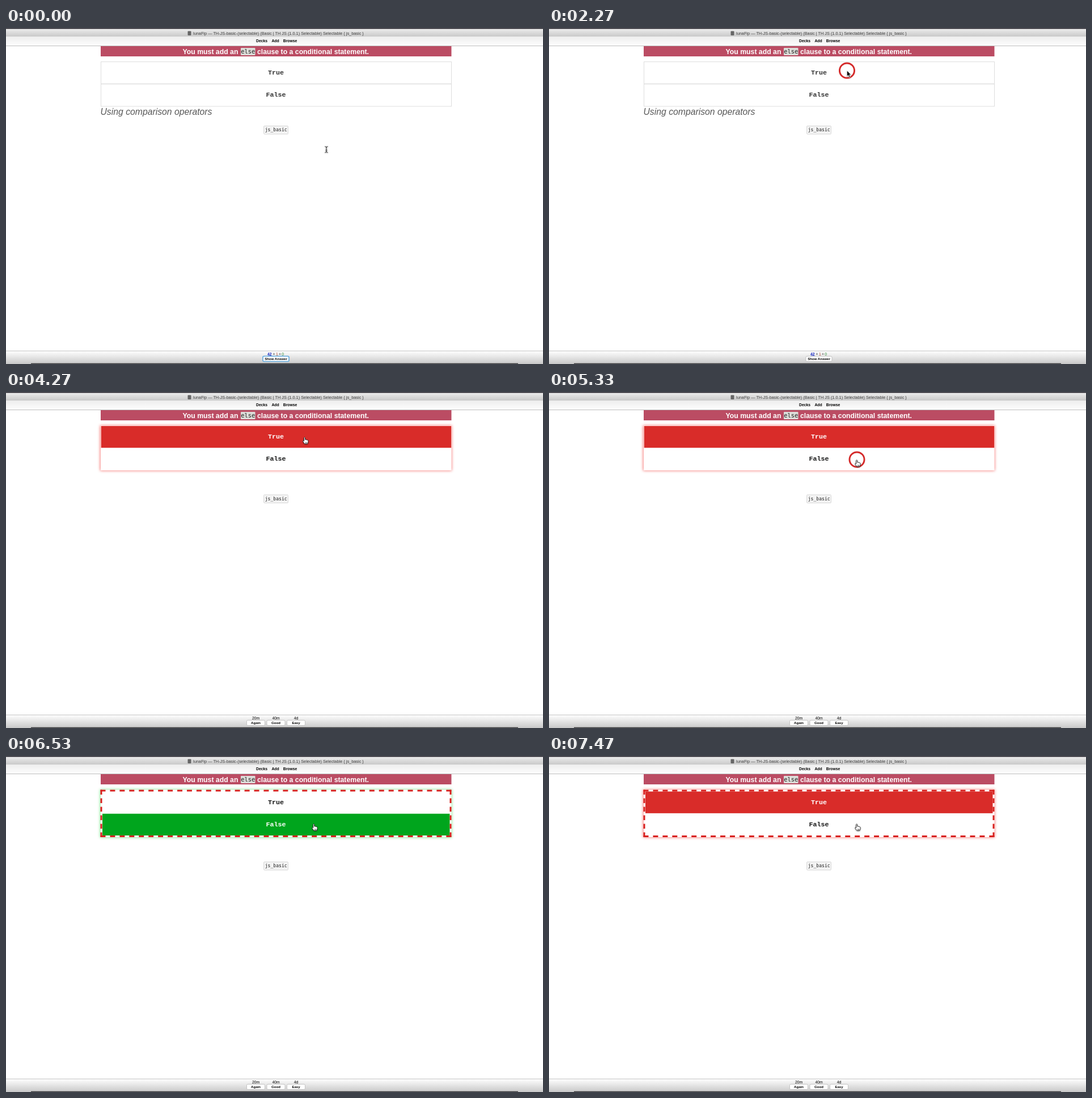
Recreate the animation shown at these times as an HTML page. Size 947x592 px, loop 8000 ms.

```html
<!DOCTYPE html>
<html lang="en">
<head>
<meta charset="utf-8">
<title>Selectable card</title>
<style>
html, body { margin: 0; width: 100%; height: 100%; overflow: hidden; background: #fff; }
svg { display: block; width: 947px; height: 592px; font-family: "Liberation Sans", Arial, sans-serif; }
text { white-space: pre; }
.b { font-weight: bold; }
.m { text-anchor: middle; }
.mono { font-family: "DejaVu Sans Mono", monospace; }
.opt { font: bold 11.7px "Liberation Mono", "Courier New", monospace; text-anchor: middle; }
.small { font-size: 6.8px; }
.btn { font-size: 6.1px; font-weight: bold; text-anchor: middle; }
</style>
</head>
<body>
<svg viewBox="0 0 947 592">
  <defs>
    <linearGradient id="bar" x2="0" y2="1"><stop stop-color="#ececec"/><stop offset="1" stop-color="#c9c9c9"/></linearGradient>
    <linearGradient id="tools" x2="0" y2="1"><stop stop-color="#ededed"/><stop offset="1" stop-color="#fdfdfd"/></linearGradient>
    <linearGradient id="foot" x2="0" y2="1"><stop stop-color="#fff"/><stop offset="1" stop-color="#c8c8c8"/></linearGradient>
    <filter id="blur" filterUnits="userSpaceOnUse" x="150" y="45" width="655" height="115"><feGaussianBlur stdDeviation="2.8"/></filter>
    <filter id="shade" x="-50%" y="-50%" width="220%" height="220%"><feDropShadow dx="0" dy="1" stdDeviation=".8" flood-opacity=".4"/></filter>
  </defs>

  <rect width="947" height="592" fill="#fff"/>
  <rect width="947" height="2" fill="#25232b"/>
  <rect y="1.5" width="947" height="13.5" fill="url(#bar)"/>
  <rect y="15" width="947" height="16" fill="url(#tools)"/>
  <rect y="31" width="947" height="1" fill="#bdbdbd"/>
  <rect x="320.5" y="5.5" width="6" height="7.5" rx="1" fill="#666"/>
  <text x="330" y="11.6" font-size="7.35" fill="#3c3c3c">lunaFip — TH-JS-basic-(selectable) (Basic | TH JS (1.0.1) Selectable) Selectable { js_basic }</text>
  <g class="b m small">
    <text x="451" y="25">Decks</text><text x="475" y="25">Add</text><text x="501" y="25">Browse</text>
  </g>

  <rect x="167" y="32" width="618.5" height="18" fill="#bb4c63"/>
  <g class="b" font-size="12.28" fill="#fff">
    <text x="311.5" y="45.6">You must add an</text>
    <text x="443" y="45.6">clause to a conditional statement.</text>
  </g>
  <rect x="414" y="35" width="25.5" height="13" rx="1" fill="#dcdcd8"/>
  <text class="mono m" x="426.7" y="45.4" font-size="10.4" fill="#222">else</text>

  <rect id="glow" x="166" width="620" y="59" filter="url(#blur)"/>
  <rect id="panel" x="167" y="59.5" width="618.5" fill="#fff"/>
  <g id="lines" fill="none" stroke="#dedede">
    <rect x="167.5" y="59.5" width="618" height="78.5"/>
    <path d="M167 98.5H785.5" stroke-width="1.6"/>
  </g>
  <rect id="mark"/>
  <g id="dash" fill="none" stroke="#d8211f" stroke-width="3">
    <path id="across" d="M166.5 61H785.5M166.5 141.5H785.5" stroke-dasharray="9 7.94"/>
    <path d="M168 59.5V143M784 59.5V143" stroke-dasharray="8.5 6.5"/>
  </g>
  <text id="yes" class="opt" x="476">True</text>
  <text id="no" class="opt" x="476">False</text>
  <text id="hint" x="166.5" y="153" font-size="15.75" font-style="italic" fill="#585858">Using comparison operators</text>
  <g id="tag">
    <rect x="454.5" y="172.5" width="43" height="14.5" rx="1.5" fill="#f3f3f3" stroke="#dadada"/>
    <text class="mono m" x="476.2" y="182.4" font-size="8.1" fill="#222">js_basic</text>
  </g>

  <rect y="569" width="947" height="23" fill="url(#foot)"/>
  <rect y="568.5" width="947" height="1" fill="#c2c2c2"/>
  <rect x="44" y="590.7" width="859" height="1.3" fill="#3a3a3c"/>
  <g id="ask">
    <g class="small">
      <text x="461" y="576.6" fill="#1526c4" class="b" text-decoration="underline">42</text>
      <text x="470.5" y="576.6" fill="#333">+</text>
      <text x="476" y="576.6" fill="#b5452c">1</text>
      <text x="481" y="576.6" fill="#333">+</text>
      <text x="486.3" y="576.6" fill="#2b8a34">0</text>
    </g>
    <rect id="show" x="453" y="578.3" width="46" height="9.2" rx="2" fill="#fff"/>
    <text class="btn" x="476" y="584.8">Show Answer</text>
  </g>
  <g id="grades"></g>

  <circle id="ring" fill="none" stroke="#d2201f"/>
  <g id="cursor" filter="url(#shade)">
    <path id="beam" d="M-2.7 -5.3Q0 -5.3 0 -3.6Q0 -5.3 2.7 -5.3M0 -4V4M-2.7 5.3Q0 5.3 0 3.6Q0 5.3 2.7 5.3M-1.5 1.2H1.5" fill="none" stroke="#333" stroke-width="1"/>
    <path id="arrow" d="M0 0V10.2L2.3 8.1L4 12L5.8 11.2L4.1 7.4H7.2Z" fill="#000" stroke="#fff" stroke-width=".7"/>
    <path id="hand" d="M-1 1Q0 -.6 1 1V4.6L2 4.2L3.2 4.8L4.4 4.7L5.2 5.5Q6.4 5.2 6.4 6.8V8.5L5.2 11.8H.2L-2.6 8Q-3.4 6.4 -2 6.3L-1 7.2ZM2 9V11M3.7 9V11" fill="#fff" stroke="#222" stroke-width=".9" stroke-linejoin="round"/>
  </g>
</svg>
<script>
const LOOP = 8000, REVEAL = 3670, EXPAND = 460;
const CLICKS = [
  { press: 2070, release: 2410, x: 525.5, y: 75 },
  { press: 5270, release: 5540, x: 543, y: 119 },
  { press: 6730, release: 6870, x: 543, y: 119 }
];
const ORANGE = [250, 143, 0], RED = [217, 44, 41], GREEN = [0, 165, 29];

const $ = id => document.getElementById(id);
const set = (id, attrs) => { for (const k in attrs) $(id).setAttribute(k, attrs[k]); };
const show = (id, on) => { $(id).style.display = on ? "" : "none"; };
const clamp = v => Math.max(0, Math.min(1, v));
const lerp = (a, b, u) => a + (b - a) * u;
const easeOut = (u, p) => 1 - (1 - u) ** p;
const rgb = c => `rgb(${c.map(Math.round)})`;
const mix = (a, b, u) => a.map((v, i) => lerp(v, b[i], u));

$("grades").innerHTML = [["20m", "Again"], ["40m", "Good"], ["4d", "Easy"]].map(([time, name], i) => {
  const x = 440.5 + 35.5 * i;
  return `<text class="small m" x="${x}" y="576.6">${time}</text>
    <rect x="${x - 16}" y="578.3" width="32" height="9.2" rx="2" fill="#fff" stroke="#b8b8b8" stroke-width=".8"/>
    <text class="btn" x="${x}" y="584.8">${name}</text>`;
}).join("");

function pointer(t) {
  if (t < REVEAL) {
    const u = clamp((t - 1200) / 800);
    return [lerp(565, 525.5, easeOut(u, 1.9)), lerp(214, 75, easeOut(u, 2.65))];
  }
  const u = clamp((t - 4270) / 400), s = u * u * (3 - 2 * u);
  return [lerp(526.5, 542.7, s), lerp(79.5, 119.5, s)];
}

function drawCursor(t) {
  const [x, y] = pointer(t);
  set("cursor", { transform: `translate(${x} ${y})` });
  show("beam", t < REVEAL && y > 138);
  show("arrow", t < REVEAL && y <= 138);
  show("hand", t >= REVEAL);
}

function drawRing(t) {
  const c = CLICKS.find(c => t >= c.press && t < c.release + EXPAND);
  show("ring", c);
  if (!c) return;
  const outer = lerp(14.5, 62, easeOut(clamp((t - c.release) / EXPAND), 2));
  set("ring", {
    cx: c.x, cy: c.y, r: outer * .9, "stroke-width": outer * .2,
    opacity: 1 - (outer / 66) ** 2
  });
}

function drawCard(t) {
  const [picked, swapped, back] = CLICKS.map(c => t >= c.release - 70);
  const revealed = t >= REVEAL, fade = clamp((t - REVEAL) / 200);
  const right = swapped && !back;
  const color = right ? GREEN : mix(ORANGE, RED, fade);
  const inset = swapped ? 3 : 0;

  show("mark", picked);
  set("mark", {
    x: swapped ? 170 : 167.7, width: swapped ? 612.5 : 617.5,
    y: right ? 101.7 : 60 + inset * .85, height: 38.3, fill: rgb(color)
  });
  show("lines", !revealed);
  show("dash", swapped);
  set("panel", { height: swapped ? 83.5 : 78.5 });
  set("glow", {
    height: swapped ? 84.5 : 79.5, opacity: fade * .75,
    fill: right ? "#5fe070" : "#f4504c"
  });
  const ink = revealed ? "#161616" : "#333";
  set("yes", { y: 82 + inset * .9, fill: picked && !right ? "#fff" : ink });
  set("no", { y: 121.3 + inset * .9, fill: right ? "#fff" : ink });
  show("hint", !revealed);
  set("tag", { transform: `translate(0 ${swapped ? 14 : revealed ? 8.5 : 0})` });

  show("ask", !revealed);
  show("grades", revealed);
  const focus = t < CLICKS[0].press;
  set("show", { stroke: focus ? "#62a9dc" : "#b8b8b8", "stroke-width": focus ? 1.6 : .8 });
}

function render(t) {
  drawCard(t);
  drawRing(t);
  drawCursor(t);
}

const start = performance.now();
function tick() {
  render((performance.now() - start) % LOOP);
  requestAnimationFrame(tick);
}
tick();
</script>
</body>
</html>
```
